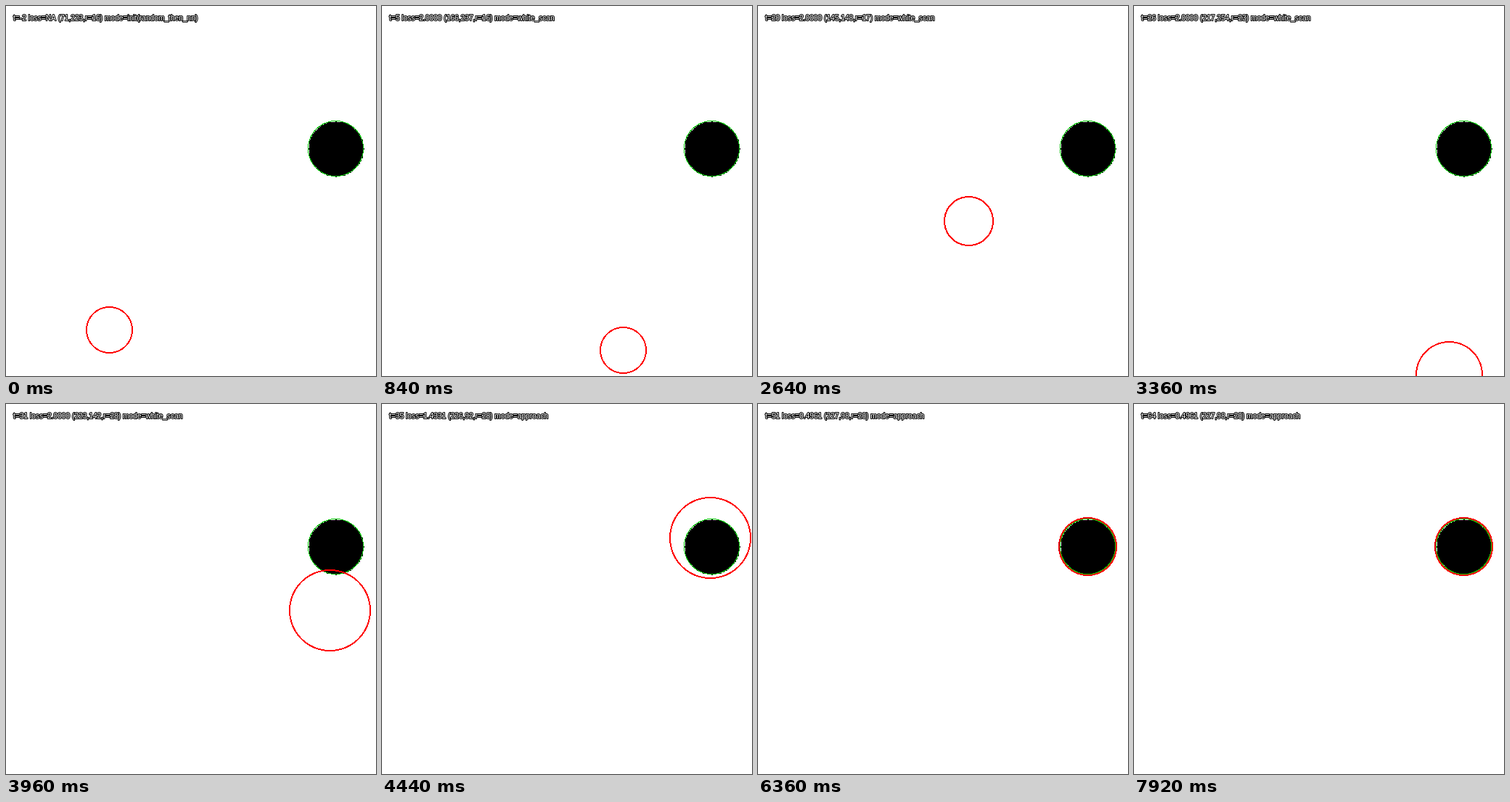
Animation of 510 by 510 pixels, one loop 8000 ms. Source, as an HTML page with a canvas:

```html
<!DOCTYPE html>
<html lang="en">
<head>
<meta charset="utf-8">
<title>Circle search</title>
<style>
  html, body { margin: 0; width: 100%; height: 100%; overflow: hidden; background: #fff; }
  canvas { display: block; }
</style>
</head>
<body>
<canvas id="stage" width="510" height="510"></canvas>
<script>
const ctx = document.getElementById('stage').getContext('2d');
const LOOP = 8000, STEP = 120, SCALE = 2;
const APPROACH = 32;
const goal = { x: 227, y: 98, r: 19 };

// Turning points of the search: step, x, y
const turns = [
  [-2, 71, 223],
  [5, 166, 237],
  [14, 84, 89],
  [19, 127, 130],
  [25, 236, 238],
  [26, 217, 254],
  [33, 226, 97],
  [35, 226, 92],
  [41, goal.x, goal.y],
];

const clamp = (v, lo, hi) => Math.min(hi, Math.max(lo, v));

function poseAt(step) {
  const next = turns.findIndex(([at]) => step < at);
  const b = turns.at(next), a = next < 0 ? b : turns[next - 1];
  const k = a === b ? 0 : (step - a[0]) / (b[0] - a[0]);
  const mix = n => Math.round(a[n] + (b[n] - a[n]) * k);
  // The radius widens by one per step, then closes in on the goal.
  const r = Math.min(clamp(step - 3, 16, 28), Math.max(20, 28 - 1.2 * (step - 35)));
  return { x: mix(1), y: mix(2), r: Math.round(r) };
}

function statusAt(step, { r }) {
  if (step < 0) return { loss: 'NA', mode: 'init(random_then_nn)' };
  if (step < APPROACH) return { loss: '2.0000', mode: 'white_scan' };
  return { loss: (0.4961 + 0.117125 * (r - 20)).toFixed(4), mode: 'approach' };
}

// Disc of hard-edged square cells; cells nearer than `hole` stay empty
function cells(cx, cy, radius, hole, size, color) {
  ctx.fillStyle = color;
  const reach = Math.floor(radius);
  for (let dy = -reach; dy <= reach; dy++) {
    for (let dx = -reach; dx <= reach; dx++) {
      const d = Math.hypot(dx, dy);
      if (d <= radius && d > hole) ctx.fillRect((cx + dx) * size, (cy + dy) * size, size, size);
    }
  }
}

function ring({ x, y, r }, color, width) {
  const outer = r * SCALE + 0.5;
  cells(x * SCALE, y * SCALE, outer, outer - width, 1, color);
}

function label(text) {
  ctx.font = '10.2px "Liberation Sans", Arial, sans-serif';
  ctx.fontKerning = 'none';
  ctx.lineJoin = 'round';
  ctx.lineWidth = 2;
  ctx.strokeStyle = '#000';
  ctx.fillStyle = '#fff';
  ctx.strokeText(text, 10, 20);
  ctx.fillText(text, 10, 20);
}

function draw(now) {
  const step = Math.floor((now % LOOP) / STEP) - 2;
  const pose = poseAt(step);
  const { loss, mode } = statusAt(step, pose);

  ctx.fillStyle = '#fff';
  ctx.fillRect(0, 0, 510, 510);
  cells(goal.x, goal.y, goal.r, -1, SCALE, '#000');
  ring(goal, '#00c800', 1);
  ring(pose, '#f00', 2);
  label(`t=${step} loss=${loss} (${pose.x},${pose.y},r=${pose.r}) mode=${mode}`);
}

let start;
function frame(now) {
  start ??= now;
  draw(Math.max(0, now - start));
  requestAnimationFrame(frame);
}
draw(0);
requestAnimationFrame(frame);
</script>
</body>
</html>
```
